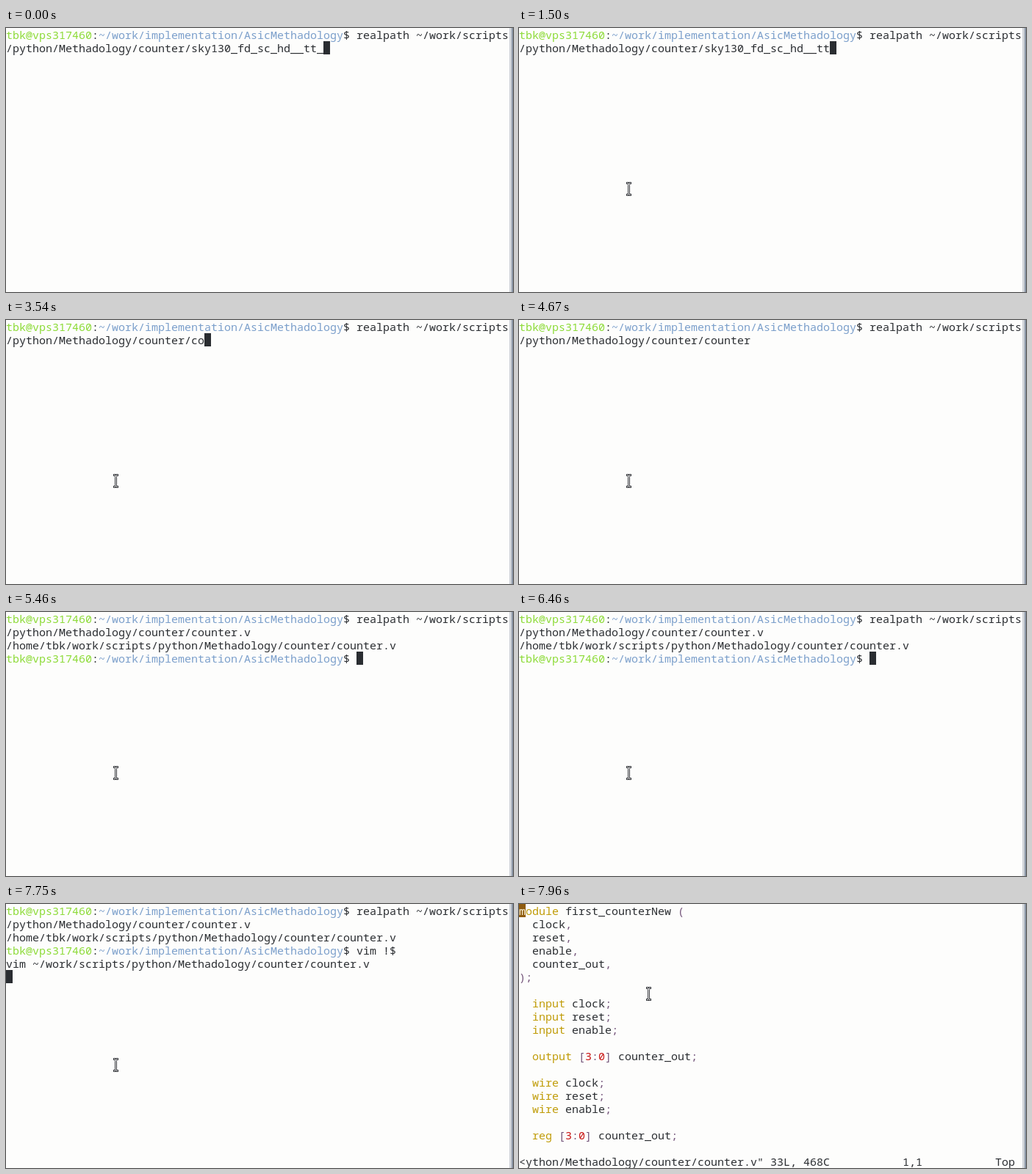
Write an HTML page with a canvas that moves like this. It is 690x360 px and loops after 8 s.

```html
<!DOCTYPE html>
<html lang="en">
<head>
<meta charset="utf-8">
<title>Terminal session</title>
<style>
  html, body { margin: 0; height: 100%; overflow: hidden; background: #fdfdfc; }
  canvas { display: block; }
</style>
</head>
<body>
<canvas id="stage" width="690" height="360"></canvas>
<script>
const ctx = document.getElementById('stage').getContext('2d');
const CELL = 9, ROW = 18, LOOP = 8000;
const INK = '#2a2d31', PAPER = '#fdfdfc', GREEN = '#8ddb38', BLUE = '#7b9fcb';
const KEYWORD = '#c09c08', NUMBER = '#c81414', PUNCTUATION = '#75567b';

const USER = 'tbk', HOST = USER + '@vps317460';
const FOLDER = '/python/Methadology/counter/';
const LIBRARY = 'sky130_fd_sc_hd__tt_';

// Each step holds from its time until the next one.
const fileSteps = [[0, ''], [3420, 'c'], [3500, 'co'], [3590, 'cou'], [3790, 'coun'],
  [3880, 'counter'], [4920, 'counter.'], [5080, 'counter.v']];
const vimSteps = [[0, ''], [6750, 'v'], [6830, 'vi'], [7000, 'vim'], [7210, 'vim '],
  [7380, 'vim !'], [7500, 'vim !$']];
const hiddenCursor = [[210, 790], [2880, 3420], [4630, 4920], [5790, 6460]];
const ENTER = 5150, OUTPUT = 5190, VIM_ENTER = 7660, VIM_OPEN = 7830;

const source = `module first_counterNew (
  clock,
  reset,
  enable,
  counter_out,
);

  input clock;
  input reset;
  input enable;

  output [3:0] counter_out;

  wire clock;
  wire reset;
  wire enable;

  reg [3:0] counter_out;`.split('\n');

const valueAt = (steps, t) => steps.filter(([start]) => start <= t).pop()[1];

function write(text, col, row, color = INK) {
  ctx.fillStyle = color;
  ctx.fillText(text, col * CELL, row * ROW + 15);
  return col + text.length;
}

function block(col, row, color = INK) {
  ctx.fillStyle = color;
  ctx.fillRect(col * CELL, row * ROW, CELL, ROW);
}

function prompt(row, command) {
  let col = write(HOST, 0, row, GREEN);
  col = write(':', col, row);
  col = write('~/work/implementation/AsicMethadology', col, row, BLUE);
  return write('$ ' + command, col, row);
}

// First backspace, then key repeat after half a second at 30 per second.
function libraryLeft(t) {
  const repeats = t < 1630 ? 0 : Math.floor((t - 1630) / 33.3) + 1;
  const deleted = (t >= 1130 ? 1 : 0) + repeats;
  return LIBRARY.slice(0, Math.max(0, LIBRARY.length - deleted));
}

function shell(t) {
  prompt(0, 'realpath ~/work/scripts');
  let row = 1;
  let col = write(FOLDER + libraryLeft(t) + valueAt(fileSteps, t), 0, row);
  if (t >= ENTER) { row = 2; col = 0; }
  if (t >= OUTPUT) {
    write(`/home/${USER}/work/scripts${FOLDER}counter.v`, 0, 2);
    row = 3;
    col = prompt(row, valueAt(vimSteps, t));
  }
  if (t >= VIM_ENTER) {
    write(`vim ~/work/scripts${FOLDER}counter.v`, 0, 4);
    row = 5;
    col = 0;
  }
  if (!hiddenCursor.some(([from, to]) => t >= from && t < to)) block(col, row);
}

function tokenColor(token) {
  if (/^(module|input|output|wire|reg)$/.test(token)) return KEYWORD;
  if (/^\d+$/.test(token)) return NUMBER;
  return /\w/.test(token) ? INK : PUNCTUATION;
}

function editor() {
  source.forEach((line, row) => {
    for (const { 0: token, index } of line.matchAll(/\w+|[^\w\s]/g)) {
      write(token, index, row, tokenColor(token));
    }
  });
  block(0, 0, '#8f5c10');
  write('m', 0, 0, '#fdf6dc');
  write('<ython/Methadology/counter/counter.v" 33L, 468C', 0, 19);
  write('1,1', 58, 19);
  write('Top', 72, 19);
}

function pointer(t) {
  if (t < 710) return;
  const k = Math.min(1, Math.max(0, (t - VIM_OPEN) / 120));
  ctx.save();
  ctx.translate(Math.round(149 + 27 * k) + 0.5, Math.round(219 - 97 * k) + 0.5);
  const beam = new Path2D('M-2-8H-1L0-7L1-8H2M0-7V7M-2 8H-1L0 7L1 8H2');
  ctx.lineCap = 'square';
  for (const [width, color] of [[3, '#3a3c40'], [1, '#f4f4f4']]) {
    ctx.lineWidth = width;
    ctx.strokeStyle = color;
    ctx.stroke(beam);
  }
  ctx.restore();
}

function edge() {
  ctx.fillStyle = '#d2d5da';
  ctx.fillRect(685, 0, 3, 360);
  ctx.fillStyle = '#8d98a8';
  ctx.fillRect(688, 0, 2, 360);
}

function draw() {
  const t = performance.now() % LOOP;
  ctx.fillStyle = PAPER;
  ctx.fillRect(0, 0, 690, 360);
  ctx.font = '15px "Noto Sans Mono", monospace';
  edge();
  if (t < VIM_OPEN) shell(t); else editor();
  pointer(t);
  requestAnimationFrame(draw);
}
draw();
</script>
</body>
</html>
```
